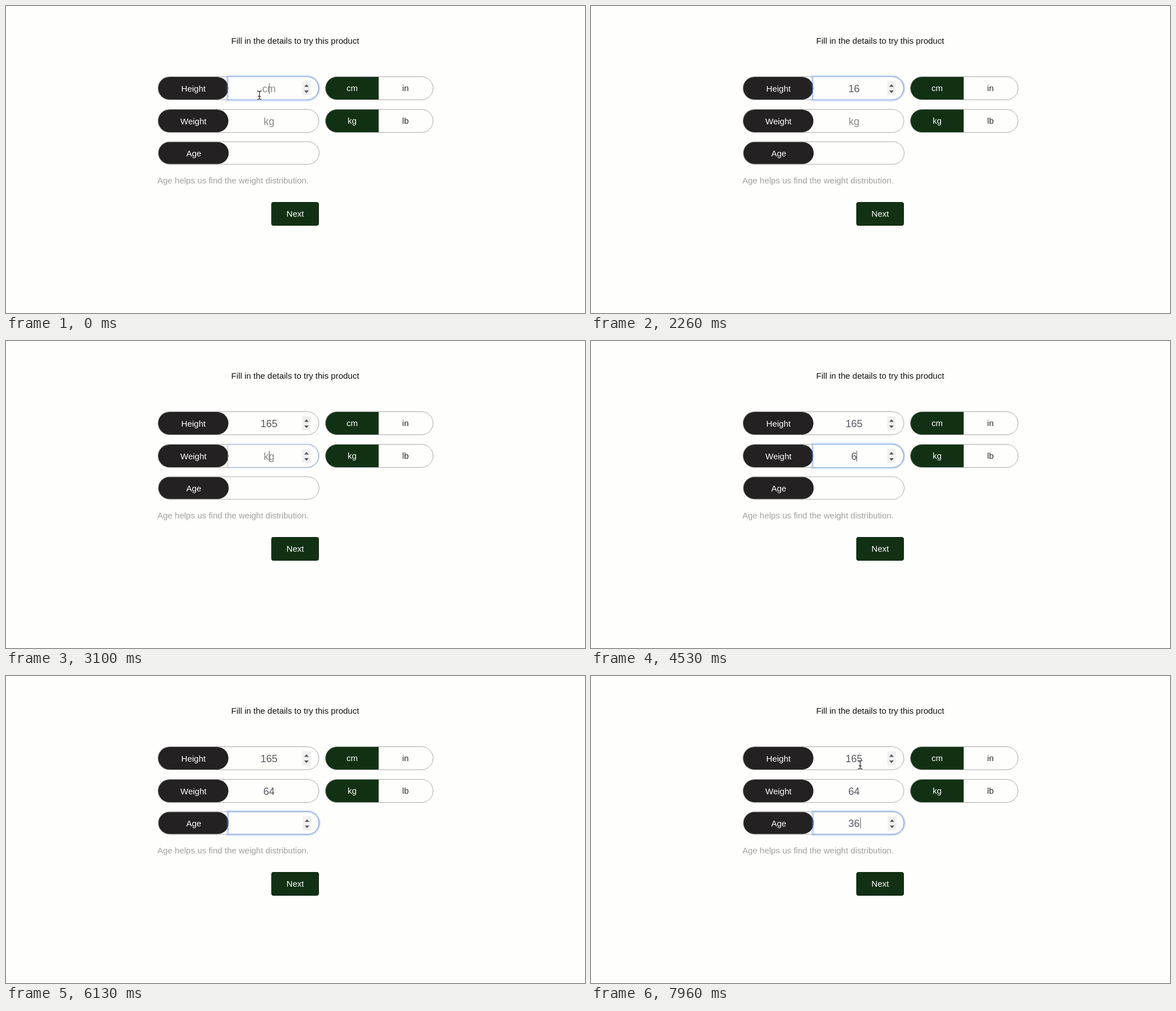
Animation of 1027 by 545 pixels, one loop 8 s. Source, as an HTML page:

```html
<!DOCTYPE html>
<html lang="en">
<head>
<meta charset="utf-8">
<title>Details form</title>
<style>
html, body { margin: 0; width: 100%; height: 100%; overflow: hidden; background: #fefefc; }
svg { display: block; width: 1027px; height: 545px; }
text { font-family: "Liberation Sans", Arial, sans-serif; font-size: 15px; text-anchor: middle; }
.value { font-size: 18px; }
</style>
</head>
<body>
<svg id="stage" viewBox="0 0 1027 545"></svg>
<script>
const LOOP = 8000, GREEN = '#123114', DARK = '#242122';
const stage = document.getElementById('stage');

function add(tag, attrs, parent = stage) {
  const el = document.createElementNS('http://www.w3.org/2000/svg', tag);
  for (const k in attrs) el.setAttribute(k, attrs[k]);
  parent.appendChild(el);
  return el;
}
function label(str, x, y, fill, extra = {}) {
  const el = add('text', { x, y, fill, ...extra });
  el.textContent = str;
  return el;
}
function pill(x, y, width, height) {
  add('rect', { x, y, width, height, rx: height / 2, fill: 'none', stroke: '#a9a9a9' });
}
// Square on the left, rounded on the right; g grows it outwards
function inputPath(x, y, w, h, g) {
  const r = h / 2 + g;
  return `M${x - g} ${y - g}H${x + w - h / 2}a${r} ${r} 0 0 1 0 ${2 * r}H${x - g}Z`;
}

function makeField(name, x, y, h, base, caretY, spinX, spinY) {
  const w = 161, left = x + 124;
  pill(x, y, 285.5, h);
  add('rect', { x: x + 0.5, y: y + 0.5, width: 124.5, height: h - 1, rx: (h - 1) / 2, fill: DARK });
  label(name, x + 63, base - 1, '#fff');
  const ring = add('path', { fill: '#3f83f4', 'fill-opacity': 0.22, 'fill-rule': 'evenodd' });
  const edge = add('path', { d: inputPath(left, y, w, h, 0), fill: 'none', stroke: '#7fa3e4' });
  const spin = add('g', { transform: `translate(${spinX} ${spinY})` });
  add('rect', { width: 15, height: 25, fill: '#f0f0f0' }, spin);
  add('path', { d: 'M3.5 10L7.5 5.5 11.5 10ZM3.5 16.5L7.5 21 11.5 16.5Z', fill: '#55555a' }, spin);
  const text = label('', 466.5, base, '#000', { class: 'value' });
  const caret = add('rect', { y: caretY, width: 1, height: 19, fill: '#555' });
  return {
    draw(s) {
      const p = s.focus;
      ring.setAttribute('d', inputPath(left, y, w, h, 0.5 + 2.6 * p) + inputPath(left, y, w, h, 0.5));
      ring.setAttribute('opacity', p);
      edge.setAttribute('opacity', Math.sqrt(p));
      spin.setAttribute('visibility', s.spin ? 'visible' : 'hidden');
      text.textContent = s.text;
      text.setAttribute('fill', s.typed ? '#5a5861' : '#8b8b8b');
      caret.setAttribute('x', s.caret || 0);
      caret.setAttribute('visibility', s.caret ? 'visible' : 'hidden');
    }
  };
}

function makeToggle(y, base, on, off) {
  add('path', { d: `M661 ${y}H587a20.5 20.5 0 0 0 0 41H661Z`, fill: GREEN });
  pill(566.5, y, 191, 41);
  label(on, 614, base, '#fff');
  label(off, 708.5, base, '#2c2c2c');
}

label('Fill in the details to try this product', 513, 66.5, '#111');
const fields = [
  makeField('Height', 269.5, 125.5, 41, 153, 137.5, 525.5, 133.5),
  makeField('Weight', 269.5, 183.5, 41, 211, 195, 525.5, 191.5),
  makeField('Age', 270, 241, 40, 268, 251.5, 526.5, 249)
];
makeToggle(125.5, 151, 'cm', 'in');
makeToggle(183.5, 209, 'kg', 'lb');
label('Age helps us find the weight distribution.', 268.5, 315, '#a0a0a0', { style: 'text-anchor:start' });
add('rect', { x: 471, y: 348.5, width: 83.5, height: 41, rx: 3, fill: GREEN, stroke: '#0c250e' });
label('Next', 513, 374, '#fff');

const beam = add('g', { fill: 'none', 'stroke-linecap': 'round' });
const beamPath = 'M-3.5 -7.5Q0 -7.5 0 -5Q0 -7.5 3.5 -7.5M0 -5V5M-3.5 7.5Q0 7.5 0 5Q0 7.5 3.5 7.5M-2 2H2';
add('path', { d: beamPath, stroke: '#fff', 'stroke-width': 3, 'stroke-opacity': 0.8 }, beam);
add('path', { d: beamPath, stroke: '#333', 'stroke-width': 1.3 }, beam);

// [time, text, caret x (0 = hidden)]
const typing = [
  [[0, '', 466.5], [800, '', 0], [1300, '1', 471], [1760, '16', 475], [2260, '16', 0],
   [2460, '165', 480], [2960, '165', 0]],
  [[0, '', 0], [3000, '', 466.5], [3500, '', 0], [4000, '', 466.5], [4500, '', 0],
   [4530, '6', 471], [5030, '6', 0], [5300, '64', 477], [5630, '64', 0]],
  [[0, '', 0], [5630, '', 467.5], [6130, '', 0], [6630, '', 467.5], [6830, '3', 472],
   [7330, '3', 0], [7830, '3', 472], [7860, '36', 477.5]]
];
const hints = ['cm', 'kg', ''];
const focusAt = [-1000, 3000, 5630, 1e5];
// [time, x, y]; no position = hidden
const pointer = [[0, 449.5, 158.5], [60, 451, 157], [95, 452.5, 155], [130, 453.5, 153.5],
  [1360], [7930, 453.5, 153.5], [7960, 477.5, 157.5]];

const latest = (list, t) => list.filter(k => k[0] <= t).pop();
const ramp = (t, a, b) => Math.min(1, Math.max(0, (t - a) / (b - a)));

function focusLevel(i, t) {
  const rise = ramp(t, focusAt[i] + 30, focusAt[i] + 140) ** 2;
  const fall = ramp(t, focusAt[i + 1], focusAt[i + 1] + 100);
  return rise * (1 - fall);
}

function render(t) {
  fields.forEach((field, i) => {
    const [, typed, caret] = latest(typing[i], t);
    const active = t >= focusAt[i] && t < focusAt[i + 1];
    field.draw({
      text: typed || hints[i], typed, caret,
      focus: focusLevel(i, t),
      spin: i === 0 || active
    });
  });
  const [, x, y] = latest(pointer, t);
  beam.setAttribute('visibility', x ? 'visible' : 'hidden');
  if (x) beam.setAttribute('transform', `translate(${x} ${y})`);
}

const start = performance.now();
function tick() {
  render((performance.now() - start) % LOOP);
  requestAnimationFrame(tick);
}
render(0);
requestAnimationFrame(tick);
</script>
</body>
</html>
```
